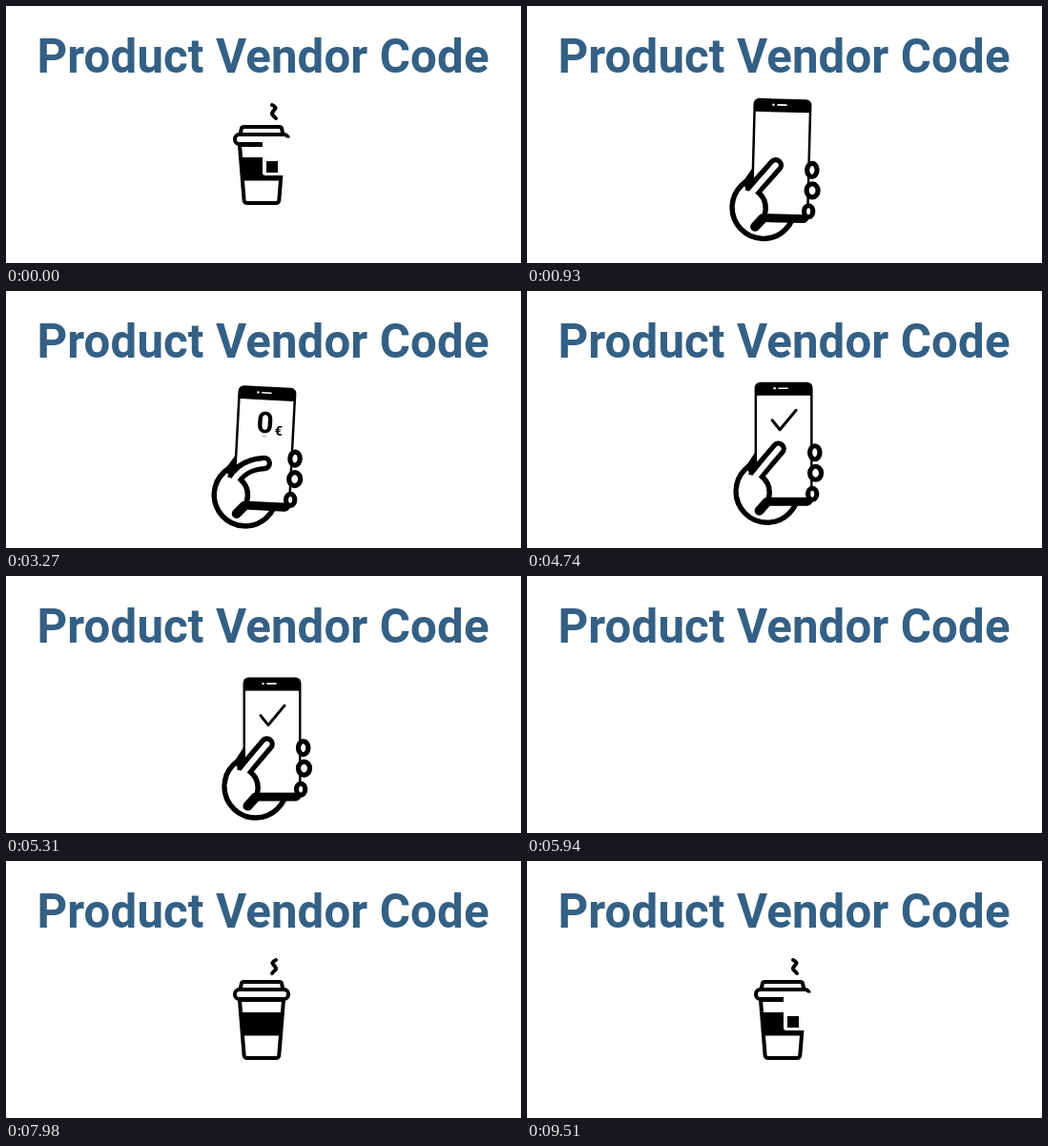
Recreate the animation shown at these times as an HTML page. Size 540x270 px, loop 9.54 s.

```html
<!DOCTYPE html>
<html lang="en">
<head>
<meta charset="utf-8">
<title>Product Vendor Code</title>
<style>
  html, body { margin: 0; width: 100%; height: 100%; overflow: hidden; background: #fff; }
  svg { display: block; width: 100vw; height: 100vh; }
  text { font-family: Roboto, sans-serif; font-weight: 700; }
  .line { fill: none; stroke: #000; stroke-linecap: round; stroke-linejoin: round; }
  .shape { fill: #fff; stroke: #000; stroke-linejoin: round; }
</style>
</head>
<body>
<svg viewBox="0 0 540 270">
  <rect width="540" height="270" fill="#fff"/>
  <text x="32.5" y="70" font-size="49.2" letter-spacing="0.12" fill="#346085">Product Vendor Code</text>

  <g id="cup">
    <path id="steam" class="line" stroke-width="4"/>
    <g class="shape" stroke-width="4">
      <path d="M245 146L249.6 204Q250 207 253 207H283Q286 207 286.3 204L291 146Z"/>
      <path d="M245.5 135L247 128.5Q247.5 127 249 127H287Q288.5 127 289 128.5L290.5 135Z"/>
      <rect x="240" y="135" width="56" height="10" rx="4.5"/>
    </g>
    <path d="M246 159H290L288 183.5H248Z"/>
    <g id="badge">
      <rect x="269" y="138.5" width="40" height="39.5" rx="3" fill="#fff"/>
      <rect x="273" y="163" width="12" height="12"/>
    </g>
  </g>

  <g id="phone">
    <circle class="shape" cx="251.2" cy="209.7" r="32.7" stroke-width="5.5"/>
    <path d="M228.500 184L239 168L243 187L235 194Z"/>
    <rect x="238" y="95" width="61" height="130" rx="6"/>
    <rect x="240.5" y="109" width="56" height="107" fill="#fff"/>
    <circle cx="259" cy="101.5" r="1.2" fill="#fff"/>
    <path d="M263.5 101.5H272.5" stroke="#fff" stroke-width="1.6" stroke-linecap="round"/>
    <g id="price">
      <text x="268" y="143.5" font-size="31" text-anchor="middle">0</text>
      <text x="282.5" y="145.5" font-size="14" text-anchor="middle">€</text>
      <rect x="265.5" y="147" width="5" height="1" fill="#999"/>
    </g>
    <path id="check" class="line" stroke-width="3" pathLength="100" d="M256.5 135L264.5 145L281.5 124.5"/>
    <path id="thumb" class="line" stroke-width="16.5"/>
    <path fill="#fff" d="M232 192L246 196C256 204 256 220 243 232Q222 229 221 208Z"/>
    <path class="line" stroke-width="5.5" d="M246 194.5C256.500 203 256.500 220 244 231"/>
    <path class="line" stroke-width="10" d="M251 221L243 230"/>
    <path id="thumbFill" class="line" style="stroke:#fff" stroke-width="6"/>
    <g class="shape" stroke-width="5.2">
      <ellipse cx="301.2" cy="169" rx="5.2" ry="7"/>
      <ellipse cx="302" cy="190.5" rx="6" ry="7"/>
      <ellipse cx="298.6" cy="212.5" rx="4.6" ry="6"/>
    </g>
  </g>
</svg>
<script>
const LOOP = 9540, STEP = 30;
const el = id => document.getElementById(id);
const set = (id, attrs) => {
  for (const k in attrs) el(id).setAttribute(k, attrs[k]);
};
const mix = (a, b, p) => a + (b - a) * p;
const ramp = (t, from, to) => {
  const p = Math.min(1, Math.max(0, (t - from) / (to - from)));
  return p * p * (3 - 2 * p);
};

// Each key: time, then values eased towards the next key
function track(keys, t) {
  let i = 0;
  while (i < keys.length - 2 && t >= keys[i + 1][0]) i++;
  const [a, b] = [keys[i], keys[i + 1]];
  const p = ramp(t, a[0], b[0]);
  return a.slice(1).map((v, n) => mix(v, b[n + 1], p));
}

// x, y, angle
const phonePath = [
  [300, -33, -4, 0], [660, 9, -3, 1], [930, -0.5, 2.5, 1.5],
  [1560, 0.5, 3, 1.8], [1740, 0.5, 3, 1.8], [3270, 5.5, 5.5, 3],
  [4470, 0, 0, 0], [4680, 0, 0, 0], [5160, 14, 18, 0],
  [5580, 2, -4, 0], [5910, -33, -14, 0]
];
const cupRise = [[6450, 46], [6780, -20], [7080, 5], [7380, 0]];

function drawCup(t) {
  const y = t < 6450 ? 0 : track(cupRise, t)[0];
  const opacity = t < 6000 ? 1 - ramp(t, 0, 360) : ramp(t, 6450, 6690);
  set('cup', { opacity, transform: `translate(0 ${y})` });

  const sway = Math.cos(2 * Math.PI * (t - LOOP) / 1020);
  const x = k => 281 + k * (t < 1000 ? 1 : sway);
  set('steam', {
    d: `M${x(-2)} 104C${x(5)} 107.5 ${x(0)} 108 ${x(-1)} 111` +
       `C${x(-4)} 114 ${x(0)} 115 ${x(2)} 118`
  });

  const shown = t < 6000 ? 1 : ramp(t, 8400, 8880);
  const drop = t < 6000 ? 0 : 9 * (1 - ramp(t, 8400, 9510));
  set('badge', { opacity: shown, transform: `translate(0 ${drop})` });
}

function drawPhone(t) {
  const [x, y, angle] = track(phonePath, t);
  set('phone', {
    opacity: ramp(t, 300, 540) * (1 - ramp(t, 5580, 5910)),
    transform: `translate(${x} ${y}) rotate(${angle} 268 100)`
  });

  const bend = ramp(t, 2700, 3060) * (1 - ramp(t, 3630, 4020));
  const curve = `${mix(251, 248, bend)} ${mix(179, 178, bend)} ` +
    `${mix(263, 269.2, bend)} ${mix(165, 175.5, bend)}`;
  set('thumb', { d: `M240 192Q${curve}` });
  set('thumbFill', { d: `M238.5 194.5Q${curve}` });

  const size = ramp(t, 1770, 2130) * (1 - ramp(t, 3660, 3870));
  set('price', {
    opacity: size,
    transform: `translate(270 134) scale(${size}) translate(-270 -134)`
  });

  const drawn = ramp(t, 3870, 4350);
  set('check', {
    opacity: drawn > 0 ? 1 : 0,
    'stroke-dasharray': `${drawn * 100} 200`
  });
}

function draw(now) {
  const t = Math.floor((now % LOOP) / STEP) * STEP;
  drawCup(t);
  drawPhone(t);
}

function tick() {
  draw(performance.now());
  requestAnimationFrame(tick);
}
tick();
</script>
</body>
</html>
```
